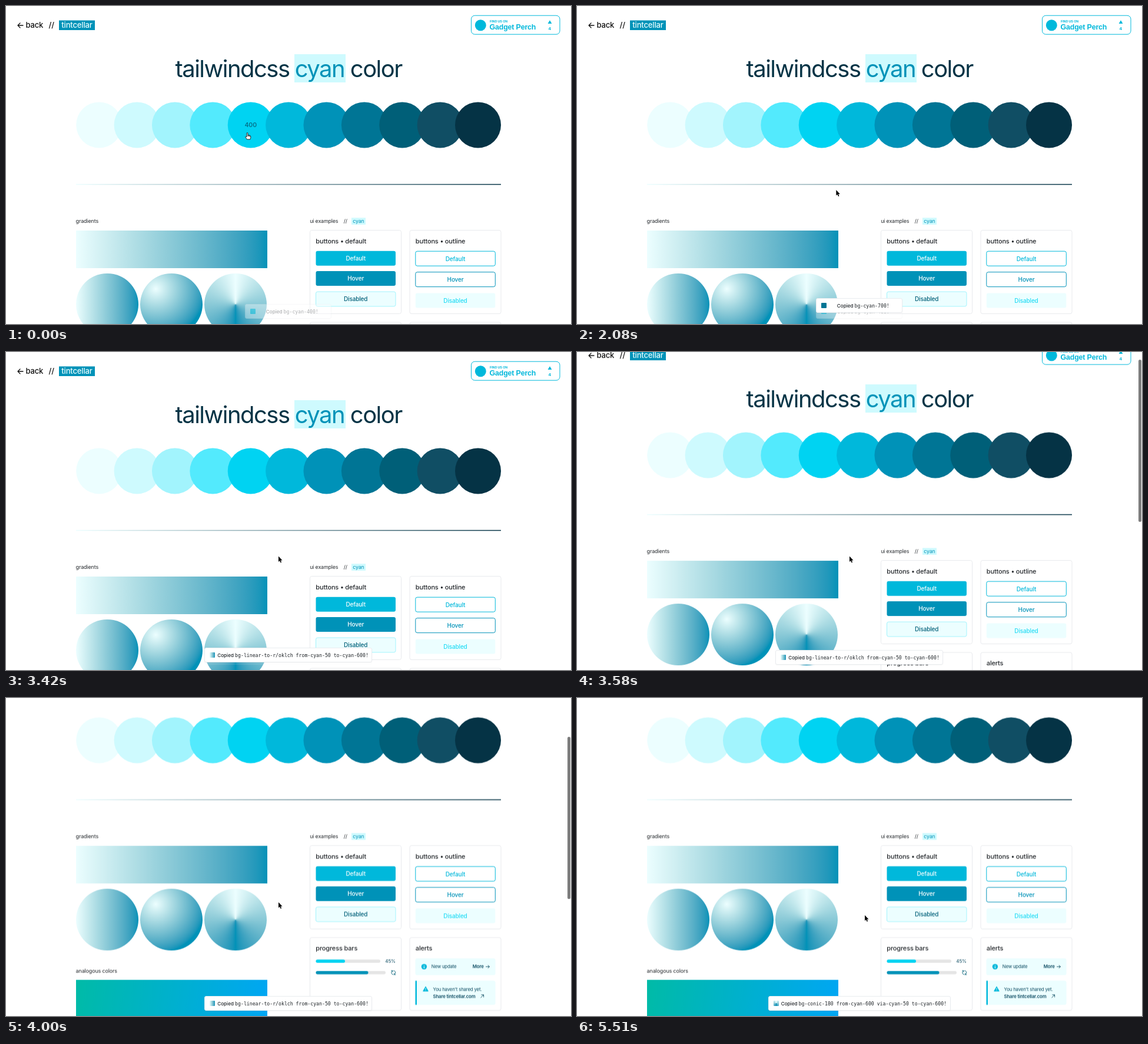
Animation, 960 px wide and 541 px high, one loop 5600 ms. Source, as an HTML page:

```html
<!DOCTYPE html>
<html lang="en">
<head>
<meta charset="utf-8">
<title>tailwindcss cyan color</title>
<style>
  html, body { margin: 0; width: 100%; height: 100%; overflow: hidden; background: #fff; }
  #stage { position: relative; width: 960px; height: 541px; overflow: hidden; background: #fff;
    font-family: Inter, "Open Sans", sans-serif; font-optical-sizing: none; }
  #page, #page svg, #page div, #cursor, #bar, .toast { position: absolute; }
  #page { left: 0; top: 0; width: 960px; height: 700px; will-change: transform; }
  #page svg { left: 0; top: 0; }
  .ball { top: 454.7px; width: 105.6px; height: 105.6px; border-radius: 50%; }
  #bar { left: 953.5px; width: 5px; height: 276px; border-radius: 3px; background: #7d7d7d; }
  #cursor { left: 0; top: 0; width: 20px; height: 20px; overflow: visible; }
  .toast { box-sizing: border-box; height: 25px; padding: 0 8px; display: flex; align-items: center;
    background: #fff; border: 1px solid #e9ecef; border-radius: 3px;
    box-shadow: 0 1px 2px rgba(0, 0, 0, .04); white-space: nowrap; color: #1f2428; }
  .toast i { flex: none; width: 9px; height: 9px; border-radius: 1px; margin-right: 4px; }
  .toast p { flex: 1; margin: 0; text-align: center; font-size: 8.1px; font-weight: 500; }
  .toast code { font: 400 8.2px "DejaVu Sans Mono", "Noto Sans Mono", monospace; }
</style>
</head>
<body>
<div id="stage">
  <div id="page"></div>
  <div id="bar"></div>
  <div id="toasts"></div>
  <svg id="cursor">
    <path id="hand" fill="#fff" stroke="#111" stroke-width=".9" stroke-linejoin="round"
      d="M-1 1.2Q-1 0 0 0Q1 0 1 1.2V4.2Q5.4 4.2 5.8 6Q6.2 9 4.8 11.4H-.6Q-2.4 8.8 -3.4 7.2Q-2.8 5.8 -1 7.4ZM1 4.2V6.4M2.8 4.5V6.6M4.4 4.8V6.8"/>
    <path id="arrow" fill="#000" stroke="#fff" stroke-width=".8" paint-order="stroke"
      d="M0 0V9.4L2.1 7.5L3.6 10.9L5.1 10.2L3.7 7H6.5Z"/>
  </svg>
</div>
<script>
const LOOP = 5600, STEP = 1000 / 12;
const cyan = {
  50: '#ecfeff', 100: '#cefafe', 200: '#a2f4fd', 300: '#53eafd', 400: '#00d3f2', 500: '#00b8db',
  600: '#0092b8', 700: '#007595', 800: '#005f78', 900: '#104e64', 950: '#053345'
};
const shades = Object.keys(cyan);
const ink = '#262a2e';
const $ = id => document.getElementById(id);

// Static page
const text = (x, y, size, str, fill = ink, weight = 400, extra = '') =>
  `<text x="${x}" y="${y}" font-size="${size}" fill="${fill}" font-weight="${weight}" ${extra}>${str}</text>`;
const mid = 'text-anchor="middle"';
const box = (x, y, w, h, fill, stroke = 'none', r = 3) =>
  `<rect x="${x}" y="${y}" width="${w}" height="${h}" rx="${r}" fill="${fill}" stroke="${stroke}"/>`;
const line = (d, color, width, extra = '') =>
  `<path d="${d}" fill="none" stroke="${color}" stroke-width="${width}" stroke-linecap="round" stroke-linejoin="round" ${extra}/>`;
const button = (x, y, label, fill, stroke, color) =>
  box(x, y, 135.5, 25, fill, stroke) + text(x + 67.7, y + 16.3, 10, label, color, 500, mid);
const meter = (y, w, value, color) =>
  box(526.5, y, w, 5.5, '#e5e5e5', 'none', 2.75) + box(526.5, y, value, 5.5, color, 'none', 2.75);
const card = (x, y, h, title) =>
  box(x, y, 155, h, '#fff', '#e8eaed') + text(x + 9.8, y + 22.2, 11, title, ink, 500);

function header() {
  const sans = 'font-family="Liberation Sans, sans-serif"';
  const c = cyan[500];
  return line('M20 33H29M24 29L20 33L24 37', '#111', 1.3) +
    text(33.5, 37.3, 13, 'back', '#111', 500) + text(72.6, 37.3, 13, '//', '#111', 500) +
    box(90, 24.5, 61, 16.5, cyan[600], 'none', 0) +
    text(120.5, 37.3, 13, 'tintcellar', cyan[50], 500, mid) +
    box(790.5, 16.2, 150.5, 32, '#fff', c, 6) +
    `<circle cx="806.3" cy="32.8" r="9.5" fill="${c}"/>` +
    text(822, 28.2, 5.5, 'FIND US ON', c, 700, sans) +
    text(821.6, 40.2, 12.4, 'Gadget Perch', c, 700, sans) +
    `<path d="M924 24.2L927.4 30H920.6Z" fill="${c}"/>` +
    text(923.6, 41, 8, '4', c, 700, sans + mid);
}

function hero() {
  const tight = 'letter-spacing="-.038em"';
  const discs = shades.map((s, i) => {
    const x = 158.2 + 64.38 * i;
    return `<circle cx="${x}" cy="202.4" r="39" fill="${cyan[s]}"/>` +
      text(x, 206.2, 10.5, s, s < 500 ? '#04738c' : cyan[100], 600, `${mid} class="label" opacity="0"`);
  }).join('');
  return text(287.5, 121.3, 40, 'tailwindcss', cyan[950], 400, tight) +
    box(490, 82, 87, 48, cyan[100], 'none', 0) +
    text(490.8, 121.3, 40, 'cyan', cyan[600], 400, tight) +
    text(584.8, 121.3, 40, 'color', cyan[950], 400, tight) + discs +
    `<linearGradient id="rule"><stop stop-color="${cyan[50]}"/><stop offset="1" stop-color="${cyan[950]}"/></linearGradient>
     <rect x="119" y="302.8" width="722" height="1.5" fill="url(#rule)"/>`;
}

function examples() {
  const [left, right] = [516.5, 686];
  const dark = cyan[900];
  return text(118.6, 369.2, 9, 'gradients') + text(118.6, 597.7, 9, 'analogous colors') +
    text(516.2, 369.2, 8.9, 'ui examples') + text(573.8, 369.2, 8.9, '//') +
    box(587, 360.3, 24, 11.6, cyan[100], 'none', 0) + text(599, 369.2, 8.8, 'cyan', cyan[600], 400, mid) +
    card(left, 381.5, 142, 'buttons • default') +
    button(526.5, 416.7, 'Default', cyan[500], 'none', '#fff') +
    button(526.5, 451, 'Hover', cyan[600], 'none', '#fff') +
    button(526.5, 486, 'Disabled', cyan[50], cyan[200], cyan[800]) +
    card(right, 381.5, 142, 'buttons • outline') +
    button(695.8, 417.2, 'Default', '#fff', cyan[500], cyan[500]) +
    button(695.8, 452.7, 'Hover', '#fff', cyan[600], cyan[600]) +
    button(695.8, 488.5, 'Disabled', cyan[50], 'none', '#22dcf5') +
    card(left, 538, 124, 'progress bars') +
    meter(575.6, 109.5, 49.5, cyan[400]) + text(662, 581.4, 8.2, '45%', dark, 400, 'text-anchor="end"') +
    meter(595, 118.5, 89, cyan[600]) +
    `<g id="spin">${line('M-3.4 -.4A3.4 3.4 0 0 1 2.6 -2.2L3.4 -1.4M3.4 -3.5V-1.4H1.3M3.4 .4A3.4 3.4 0 0 1 -2.6 2.2L-3.4 1.4M-3.4 3.5V1.4H-1.3', cyan[800], .9)}</g>` +
    card(right, 538, 124, 'alerts') +
    box(695.5, 573.5, 136, 28.5, cyan[50]) +
    `<circle cx="710.4" cy="587.6" r="4.7" fill="${cyan[500]}"/>` +
    line('M710.4 587.4V590M710.4 585.3V585.4', '#fff', 1.1) +
    text(722.7, 590.4, 7.8, 'New update', dark) + text(792.8, 590.4, 7.8, 'More', dark, 600) +
    line('M815.6 587.6H821.4M819 585.2L821.4 587.6L819 590', dark, .9) +
    box(695.5, 611.5, 136, 41, cyan[50]) + box(695.5, 611.5, 2.5, 41, cyan[500], 'none', 0) +
    `<path d="M713 621.6L717.3 629.2H708.7Z" fill="${cyan[500]}" stroke="${cyan[500]}" stroke-linejoin="round"/>` +
    line('M713 624.2V626.2M713 628V628.1', '#fff', .9) +
    text(725.6, 629.4, 7.8, 'You haven\'t shared yet.', dark) +
    text(725.6, 640.6, 7.8, 'Share tintcellar.com', dark, 600) +
    line('M806.8 640.2L811.6 635.4M807.8 635.4H811.6V639.2', dark, .9);
}

const ramp = `${cyan[50]}, ${cyan[600]}`;
const linear = `linear-gradient(to right in oklch, ${ramp})`;
const radial = `radial-gradient(at 25% 25% in oklch, ${ramp} 75%)`;
const conic = `conic-gradient(from 180deg in oklch, ${cyan[600]}, ${ramp})`;
const block = (y, fill) =>
  `<div style="left:119px;top:${y}px;width:324.5px;height:64px;background:${fill}"></div>`;

$('page').innerHTML = block(381.5, linear) + block(610.3, 'linear-gradient(100deg, #00bba7, #00a6f4)') +
  [linear, radial, conic].map((g, i) =>
    `<div class="ball" style="left:${119 + 109.2 * i}px;background:${g}"></div>`).join('') +
  `<svg width="960" height="700" letter-spacing="-.01em">${header()}${hero()}${examples()}</svg>`;

// Toasts: each fades in, drops when the older one leaves, then fades out
const FADE = 400;
const toasts = [
  { code: 'bg-cyan-400', fill: cyan[400], width: 147, start: -80, end: 1900 },
  { code: 'bg-cyan-700', fill: cyan[700], width: 147, start: 1300, end: 3150 },
  { code: 'bg-linear-to-r/oklch from-cyan-50 to-cyan-600', fill: linear, width: 285, start: 2600, end: 4750 },
  { code: 'bg-conic-180 from-cyan-600 via-cyan-50 to-cyan-600', fill: conic, width: 310, start: 4480, end: 9000 }
];
$('toasts').innerHTML = toasts.map(o =>
  `<div class="toast"><i style="background:${o.fill}"></i><p>Copied <code>${o.code}!</code></p></div>`).join('');
toasts.forEach((o, i) => o.el = $('toasts').children[i]);

// Motion tables
const path = [
  [0, 410, 215.5], [580, 410, 215.5], [920, 601, 213], [1830, 601, 213], [2330, 288, 408],
  [3000, 288, 408], [3420, 463, 347.5], [4180, 463, 347.5], [4450, 410, 375],
  [4750, 410, 375], [5200, 489, 369.5]
];
const scroll = [[3500, 0], [3583, 26.7], [3667, 74], [3750, 113.5], [3833, 125], [3917, 129], [4000, 130.5]];
const hands = [[0, 1960], [2290, 3190], [4290, 4960]];
const hover = { 4: [-200, 675], 5: [675, 750], 6: [750, 825], 7: [825, 1900] };

const clamp = v => Math.min(1, Math.max(0, v));
const out = v => 1 - (1 - clamp(v)) ** 2;
const inOut = v => v < .5 ? 2 * v * v : 1 - 2 * (1 - v) ** 2;
const same = v => v;

function at(keys, t, ease = same) {
  const i = keys.findIndex(k => k[0] > t);
  if (i === 0) return keys[0].slice(1);
  if (i < 0) return keys[keys.length - 1].slice(1);
  const [a, b] = [keys[i - 1], keys[i]];
  const u = ease((t - a[0]) / (b[0] - a[0]));
  return a.slice(1).map((v, n) => v + (b[n + 1] - v) * u);
}

const labels = [...document.querySelectorAll('.label')];

function draw(t) {
  const [y] = at(scroll, t);
  $('page').style.transform = `translateY(${-y}px)`;
  $('bar').style.top = y * .507 - .5 + 'px';
  $('bar').style.opacity = t < 3540 ? 0 : clamp((4650 - t) / 250);
  $('spin').setAttribute('transform', `translate(658.3 597.7) rotate(${(t - 3750) * .36})`);

  for (const i in hover) {
    const [a, b] = hover[i];
    labels[i].setAttribute('opacity', clamp((t - a) / 120) * clamp(1 - (t - b) / 120));
  }

  const width = Math.max(...toasts.filter(o => o.start <= t).map(o => o.width));
  toasts.forEach((o, i) => {
    const drop = i ? out((t - toasts[i - 1].end) / FADE) : 1;
    Object.assign(o.el.style, {
      left: 479.8 - width / 2 + 'px',
      top: 474.5 + 32.5 * drop + 'px',
      width: width + 'px',
      opacity: out((t - o.start) / FADE) * (1 - out((t - o.end) / FADE))
    });
  });

  const [cx, cy] = at(path, t, inOut);
  const hand = hands.some(([a, b]) => t >= a && t < b);
  $('cursor').style.transform = `translate(${cx}px, ${cy}px)`;
  $('hand').style.display = hand ? '' : 'none';
  $('arrow').style.display = hand ? 'none' : '';
}

const begin = performance.now();
function tick() {
  const ms = (performance.now() - begin) % LOOP;
  draw(Math.floor((ms + 4) / STEP) * STEP);
  requestAnimationFrame(tick);
}
tick();
</script>
</body>
</html>
```
